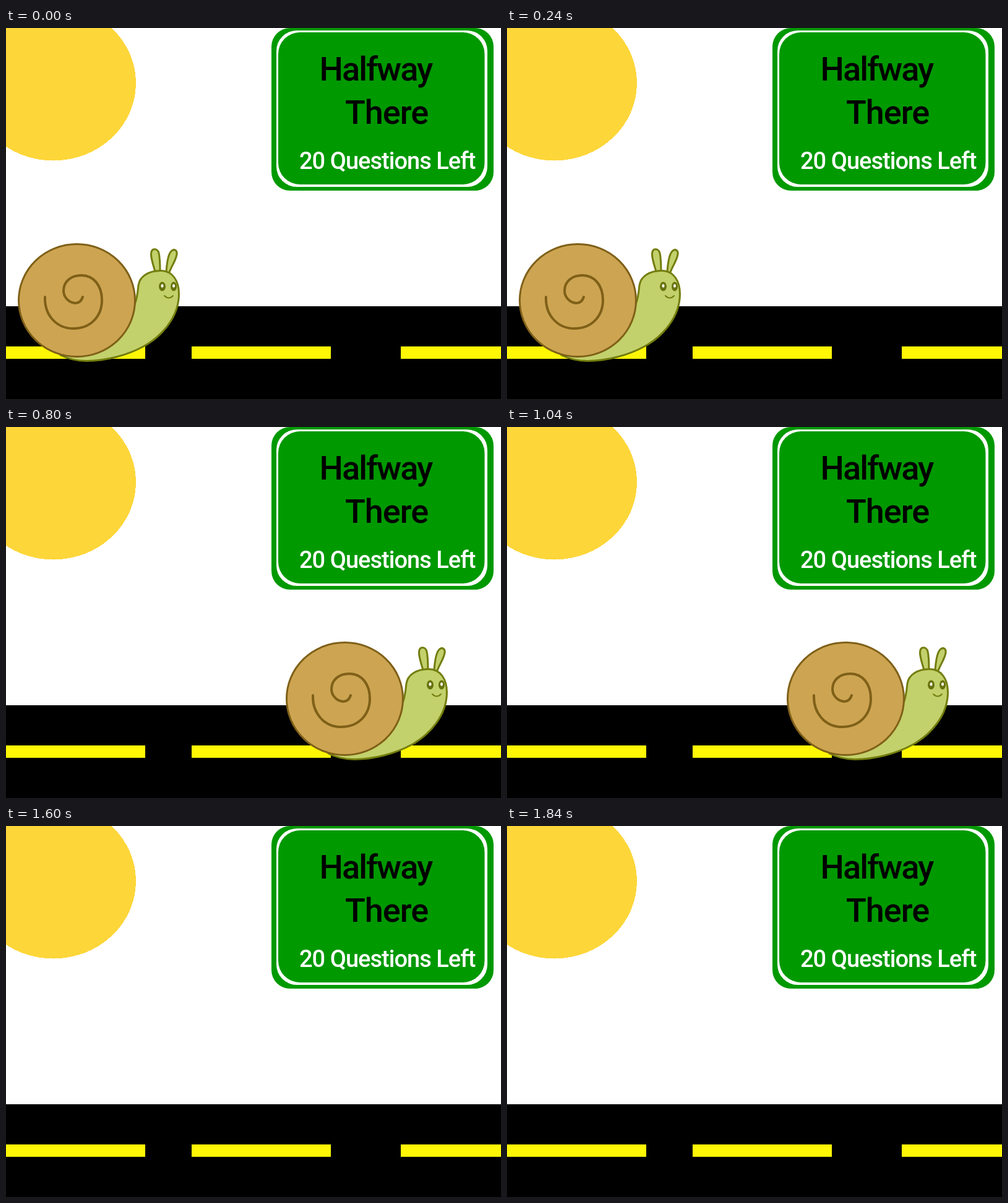
Animation of 800x600 px, one loop 2 s. Source, as an HTML page:

```html
<!DOCTYPE html>
<html lang="en">
<head>
<meta charset="utf-8">
<title>Halfway There</title>
<style>
  html, body { margin: 0; width: 100%; height: 100%; overflow: hidden; background: #fff; }
  svg { display: block; width: 100%; height: 100%; }
  text { font-family: Roboto, sans-serif; font-weight: 500; }
  .title { font-size: 54px; letter-spacing: -2px; }
  .shell { fill: #cda552; stroke: #7f6018; stroke-width: 3; }
  .spiral { fill: none; stroke: #7f6018; stroke-width: 4; stroke-linecap: round; }
  .skin { fill: #c2d16b; stroke: #737d0e; stroke-width: 3; stroke-linejoin: round; }
  .eye { fill: #68720c; }
  .mouth { fill: none; stroke: #737d0e; stroke-width: 2; stroke-linecap: round; }
</style>
</head>
<body>
<svg viewBox="0 0 800 600">
  <ellipse cx="76.500" cy="89" rx="133.500" ry="125.500" fill="#fdd639" shape-rendering="crispEdges"/>

  <g fill="#009900">
    <rect x="429" width="359" height="263" rx="30"/>
    <rect x="437" y="4" width="341" height="253" rx="33" fill="#fff"/>
    <rect x="440" y="7" width="333.500" height="246" rx="35"/>
  </g>
  <text class="title" x="506.500" y="85">Halfway</text>
  <text class="title" x="548" y="154.500" style="letter-spacing:-1px">There</text>
  <text x="474" y="228" fill="#fff" font-size="38" letter-spacing="-1">20 Questions Left</text>

  <rect y="450" width="800" height="150"/>
  <path d="M0 515H225V535H0ZM300 515H525V535H300ZM638 515H800V535H638Z" fill="#fff705"/>

  <g id="snail">
    <path class="skin" d="M241 394C237 380 234 372 234.500 365C235 355 245 356 247 364C249 373 249 382 249 394"/>
    <path class="skin" d="M259 394C260 380 262 366 267 361C272 356 277 360 276 366C275 375 268 384 264 395"/>
    <path class="skin" d="M208 447C212 438 213 426 214 416C216 402 230 392.500 250 392.500C270 392.500 279.500 410 279.500 430C279.500 468 251 499 223 514.500C195 530 160 538.500 130 538.500C113 538.500 100 535 88 529Z"/>
    <ellipse class="shell" cx="114.500" cy="440.500" rx="94" ry="91"/>
    <path class="spiral" d="M124 435C122 441 118 445 112 445C101 444 93 435 93 425C93 410 105 400 122 400C142 400 155 417 155 440C155 467 136 486 109 486C82 486 62 465 63 435"/>
    <ellipse class="eye" cx="252.500" cy="418" rx="5.500" ry="7.500"/>
    <ellipse class="eye" cx="271" cy="418" rx="5" ry="7.500"/>
    <ellipse cx="252.500" cy="417" rx="2" ry="2.800" fill="#fff"/>
    <ellipse cx="271" cy="417" rx="2" ry="2.800" fill="#fff"/>
    <path class="mouth" d="M256 433Q263 440 270 433"/>
  </g>
</svg>
<script>
  const STEP_MS = 400;
  // Offsets of the snail; the last one is beyond the right edge.
  const steps = [[0, 0], [198, -2], [433, -1], [639, -2], [850, 0]];
  const snail = document.getElementById('snail');

  function draw() {
    const [x, y] = steps[Math.floor(performance.now() / STEP_MS) % steps.length];
    snail.setAttribute('transform', `translate(${x} ${y})`);
    requestAnimationFrame(draw);
  }
  draw();
</script>
</body>
</html>
```
